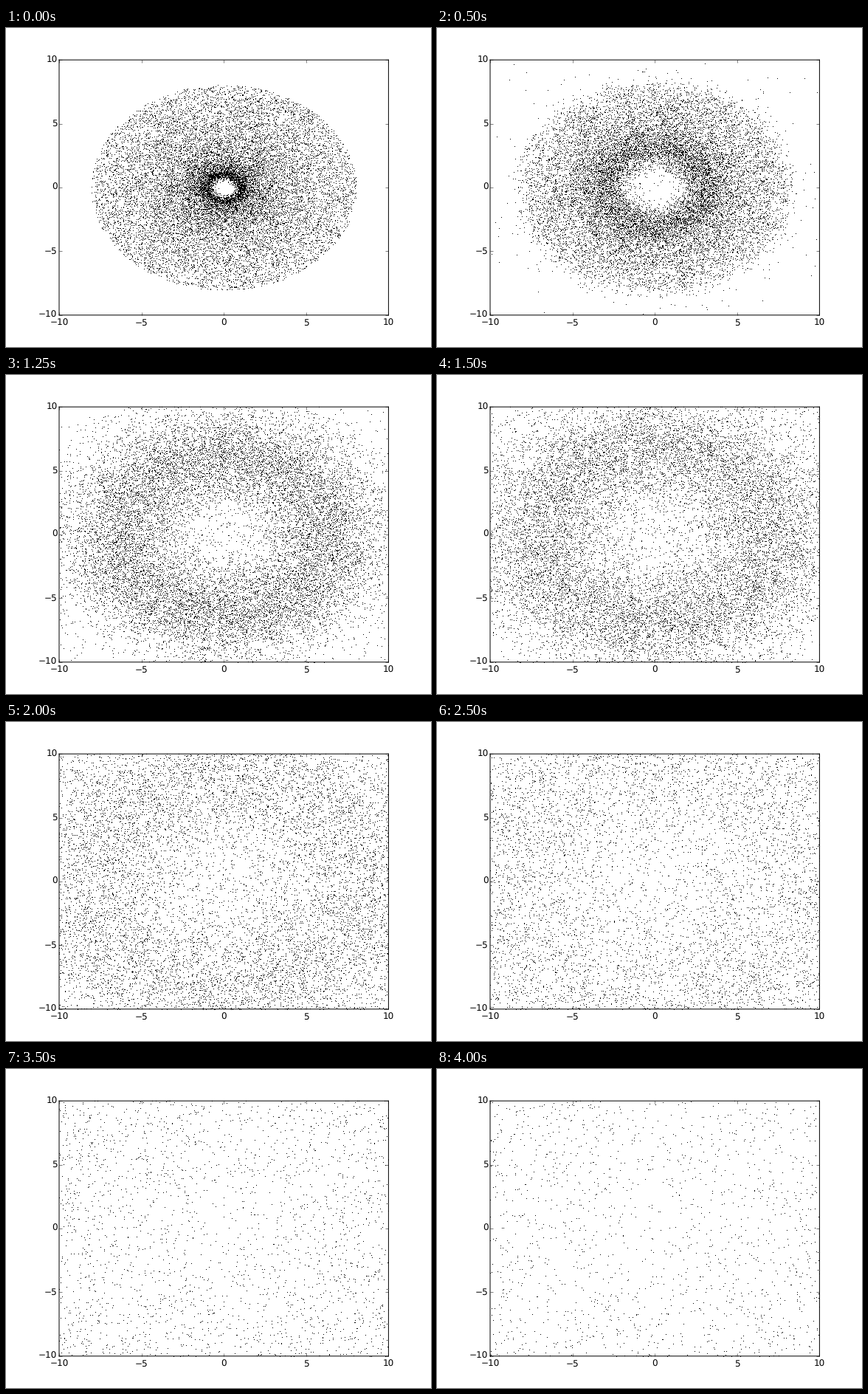
Write a matplotlib script that moves like this. It is 576 px wide and 432 px high and loops after 4250 ms.

```python
import numpy as np
import matplotlib.pyplot as plt
from matplotlib.animation import FuncAnimation

plt.style.use("classic")
plt.rcParams["font.family"] = "DejaVu Sans"
plt.rcParams["text.hinting"] = "no_hinting"

FRAMES, STEP_MS = 17, 250
STARS, DISC = 17500, 8.05

rng = np.random.default_rng(4)
r0 = rng.uniform(0.01, DISC, STARS)
angle = rng.uniform(0, 2 * np.pi, STARS)
radial = np.array([np.cos(angle), np.sin(angle)])
tangent = np.array([-radial[1], radial[0]])
start = r0 * radial

# Orbital speed falls off as 1/sqrt(r), with some spread
speed = rng.normal(1, 0.27, STARS) / np.sqrt(r0)
drift = rng.normal(size=(2, STARS)) * np.exp(0.3 * rng.normal(size=STARS))


def positions(t):
    """Star positions after t seconds of unbound flight."""
    hole = 0.95 + 3.4 * t + 0.13 * t**2
    reach = np.sqrt(2 * (hole / np.sqrt(3)) ** 3)
    return (start + reach * speed * tangent + 1.15 * t**1.45 * drift).T


fig = plt.figure(figsize=(8, 6), dpi=72, facecolor="white")
ax = fig.add_axes([0.125, 0.1, 0.775, 0.8])
ax.set(xlim=(-10, 10), ylim=(-10, 10))
ax.set_xticks(range(-10, 11, 5))
ax.set_yticks(range(-10, 11, 5))
ax.tick_params(axis="x", pad=5)
ax.tick_params(axis="y", pad=2.5)

# Subpixel placement for the frame and the points
for spine in ax.spines.values():
    spine.set_snap(False)
stars = ax.scatter([], [], s=1, c="black", marker="s", linewidths=0,
                   snap=False)


def update(i):
    stars.set_offsets(positions(i * STEP_MS / 1000))
    return stars,


anim = FuncAnimation(fig, update, frames=FRAMES, interval=STEP_MS,
                     repeat=True, repeat_delay=0)
plt.show()
```
